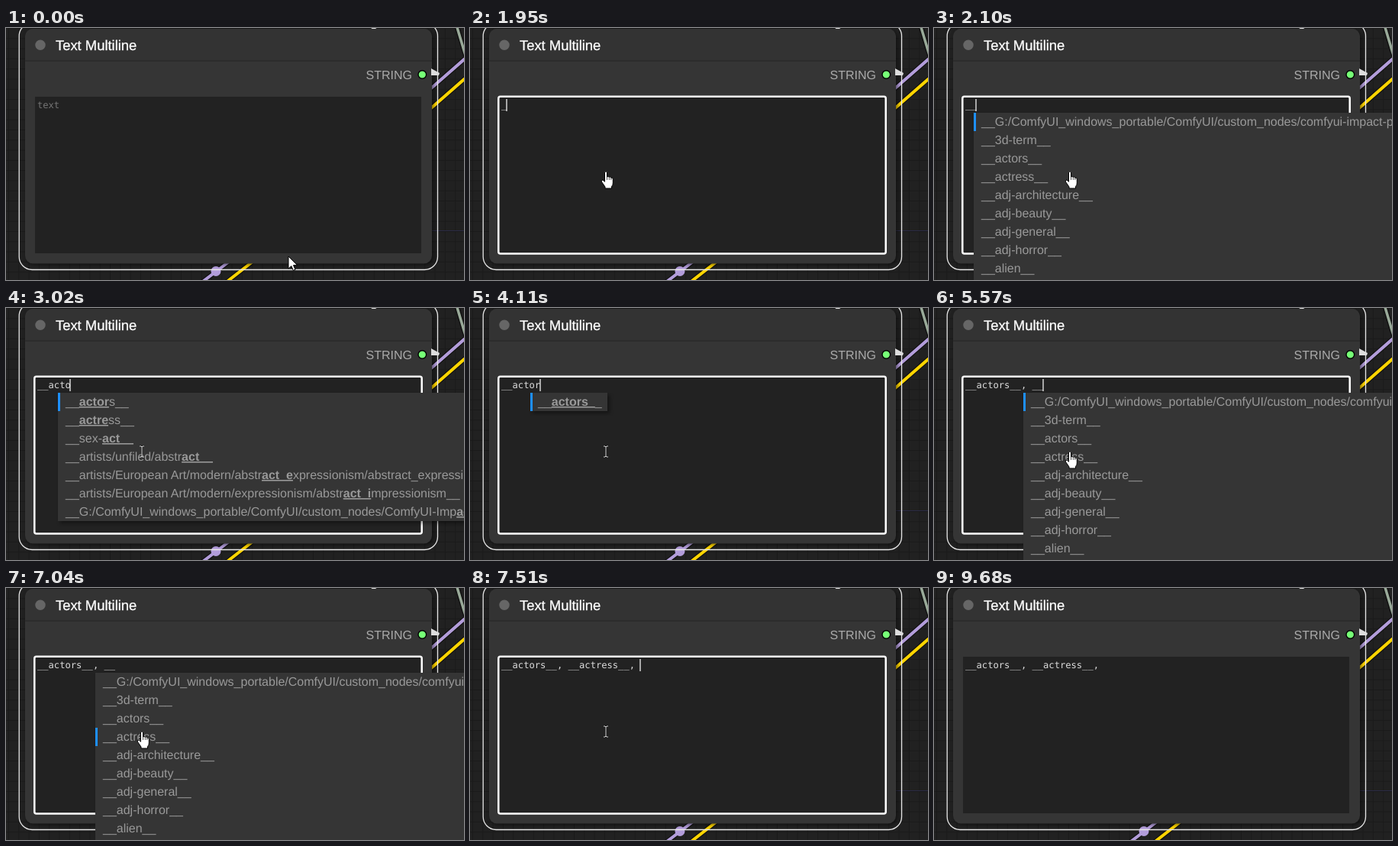
An HTML page for the animation above (9.76 s loop, 600 by 330 pixels).

```html
<!DOCTYPE html>
<html lang="en">
<head>
<meta charset="utf-8">
<title>Text Multiline</title>
<style>
  html, body { margin: 0; width: 100%; height: 100%; overflow: hidden; background: #1f1f1f; }
  svg { display: block; width: 600px; height: 330px; }
  text { white-space: pre; text-rendering: geometricPrecision; }
  .ui { font-family: "Liberation Sans", Arial, sans-serif; font-size: 16px; fill: #999; }
  .mono { font-family: "DejaVu Sans Mono", monospace; font-size: 12.12px; }
  .hit { font-weight: bold; text-decoration: underline; }
</style>
</head>
<body>
<svg viewBox="0 0 600 330" xmlns="http://www.w3.org/2000/svg">
  <defs>
    <pattern id="grid" width="13.3" height="13.3" patternUnits="userSpaceOnUse" x="3" y="0">
      <rect width="13.3" height="13.3" fill="#212121"/>
      <path d="M0 .5H13.3M.5 0V13.3" stroke="#1a1a1a"/>
    </pattern>
    <filter id="soft" x="-10%" y="-10%" width="120%" height="120%"><feGaussianBlur stdDeviation="2.5"/></filter>
  </defs>

  <rect width="600" height="330" fill="url(#grid)"/>
  <path d="M558 265.5H600" stroke="#2b2b45"/>
  <g fill="none">
    <g stroke="#111" stroke-width="6.5">
      <path d="M590 -4L602 36M250 338L300 300M282 338L332 299M550 85L606 36M550 111L606 62"/>
    </g>
    <path d="M590 -4L602 36" stroke="#99aa99" stroke-width="3.5"/>
    <path d="M250 338L300 300M550 85L606 36" stroke="#b39ddb" stroke-width="4"/>
    <path d="M282 338L332 299M550 111L606 62" stroke="#ffd500" stroke-width="4"/>
    <path d="M476 -3L486 3" stroke="#fff" stroke-width="3"/>
  </g>
  <circle cx="275" cy="318.5" r="6.5" fill="#b39ddb"/>

  <rect x="27" y="3" width="533" height="307" rx="10" fill="#000" opacity=".5" filter="url(#soft)"/>
  <rect x="17.2" y="-6.5" width="548.3" height="323" rx="17" fill="none" stroke="#e8e8e8" stroke-width="1.3"/>
  <rect x="25" y="1" width="533" height="307.5" rx="10.5" fill="#353535"/>
  <path d="M25 43V11.500a10.500 10.500 0 0 1 10.500-10.500H547.500a10.500 10.500 0 0 1 10.500 10.500V43Z" fill="#333"/>
  <path d="M25 43H558" stroke="#2a2a2a" stroke-width="1.3"/>
  <path d="M557 53L568 59L567 62L557 62Z" fill="#ddd"/>
  <circle cx="45" cy="22.300" r="6.700" fill="#666"/>
  <text class="ui" x="65" y="28.500" style="font-size:18.400px;fill:#fff;stroke:#fff;stroke-width:.3px">Text Multiline</text>
  <text class="ui" x="532" y="67" text-anchor="end" style="fill:#aaa">STRING</text>
  <circle cx="545.300" cy="61" r="5.300" fill="#7f7" stroke="#000" stroke-width="1.400"/>

  <rect x="38" y="90" width="506" height="205" fill="#222"/>
  <rect id="ring" x="37.300" y="89.800" width="507.400" height="205.700" rx="2.500" fill="none" stroke="#fff" stroke-width="2.500"/>
  <text id="typed" class="mono" x="41" y="105"></text>
  <rect id="caret" y="93" width="1.200" height="16" fill="#fff"/>
  <g id="popup"></g>

  <g id="arrow">
    <path d="M0 0V16.200L3.800 12.700L6.400 18.500L9 17.300L6.500 11.700H11.600Z" fill="#fff" stroke="#000" stroke-linejoin="round"/>
  </g>
  <g id="beam" fill="none">
    <path d="M-3 -7H-1L0 -6L1 -7H3M0 -6V6M-3 7H-1L0 6L1 7H3" stroke="#000" stroke-width="2.400" opacity=".45"/>
    <path d="M-3 -7H-1L0 -6L1 -7H3M0 -6V6M-3 7H-1L0 6L1 7H3" stroke="#ddd"/>
  </g>
  <g id="hand">
    <path d="M-1.500 1Q0 -1.500 1.500 1V7Q3 5.700 4.300 7.300Q5.700 6.400 6.800 8Q9.300 7.600 9.300 10V15Q9.300 18 7.500 19.500V22H-1V20L-5.500 13.500Q-6.500 11 -4 11L-1.500 13.300Z"
      fill="#fff" stroke="#000" stroke-linejoin="round"/>
    <path d="M1.500 7V11M4.300 7.500V11M6.800 8V11" stroke="#000" stroke-width=".7"/>
  </g>
</svg>
<script>
const LOOP = 9760, ADVANCE = 7.3, ROW = 24;
const $ = id => document.getElementById(id);
const ROOT = "__G:/ComfyUI_windows_portable/ComfyUI/custom_nodes/";
const ALL = [ROOT + "comfyui-impact-pack/wildcards__", "__3d-term__", "__actors__", "__actress__",
  "__adj-architecture__", "__adj-beauty__", "__adj-general__", "__adj-horror__", "__alien__", "__animals__"];
const ACT = ["__actors__", "__actress__", "__sex-act__", "__artists/unfiled/abstract__",
  "__artists/European Art/modern/abstract_expressionism/abstract_expressionism__",
  "__artists/European Art/modern/expressionism/abstract_impressionism__",
  ROOT + "ComfyUI-Impact-Pack/wildcards__"];

const FIRST = "__actors__, ", FULL = FIRST + "__actress__, ";
// Each track lists [start time, value].
const TEXT = [[0, ""], [1720, "_"], [2100, "__"], [2410, "__a"], [2640, "__ac"], [2870, "__act"],
  [3020, "__acto"], [3100, "__actor"], [4340, FIRST], [5260, FIRST + "_"], [5490, FIRST + "__"], [7420, FULL]];
const CARET = [[0, 0], [460, 1], [940, 0], [1410, 1], [3560, 0], [4110, 1], [4880, 0], [5260, 1],
  [6030, 0], [6500, 1], [7040, 0], [7420, 1], [7970, 0], [8520, 1], [8980, 0], [9530, 1], [9680, 0]];
// Popup value: prefix the list was opened for, or an empty string.
const POPUP = [[0, ""], [2020, "_"], [2100, "__"], [2490, "__a"], [2640, "__ac"], [2870, "__act"],
  [3100, "__actor"], [4420, ""], [5420, FIRST + "_"], [5570, FIRST + "__"], [7510, ""]];
const PICK = [[0, 0], [6340, 1], [6580, 2], [6890, 3], [7510, 0]];
const HAND = [[0, 0], [1950, 1], [3100, 0], [5340, 1], [7510, 0]];
const HOVER_BEAM = [[0, 0], [2490, 1], [3100, 0]];

const at = (track, t) => track.reduce((v, [start, next]) => t >= start ? next : v, track[0][1]);
const step = (t, from, to, count) =>
  t < from ? 0 : Math.min(1, (Math.floor((t - from) / (to - from) * (count - 1) + 1e-6) + 1) / count);
const show = (node, on) => node.setAttribute("visibility", on ? "visible" : "hidden");

function pointer(t) {
  if (t < 8520) {
    const k = step(t, 70, 540, 7), e = 1 - (1 - k) ** 2;
    return [370 - 192 * e, 299 - 111 * e];
  }
  const k = step(t, 8520, 9220, 8), u = 1 - k;
  const curve = (a, b, c, d) => u ** 3 * a + 3 * u * u * k * b + 3 * u * k * k * c + k ** 3 * d;
  return [curve(178, 95, 230, 450), curve(188, 210, 285, 345)];
}

function markup(item, word) {
  const term = word.replace(/^_+/, "");
  const i = term ? item.indexOf(term) : -1;
  if (i < 0) return item;
  const end = i + word.length;
  return `${item.slice(0, i)}<tspan class="hit">${item.slice(i, end)}</tspan>${item.slice(end)}`;
}

let popupKey = null;
function drawPopup(prefix, pick) {
  const key = prefix + "|" + pick;
  if (key === popupKey) return;
  popupKey = key;
  if (!prefix) { $("popup").innerHTML = ""; return; }
  const word = prefix.split(", ").pop();
  const items = word === "__actor" ? ["__actors__"]
    : word.startsWith("__ac") ? ACT
    : word === "__a" ? ALL.slice(2) : ALL;
  const x = Math.round(41 + 5.43 * prefix.length), y = 111;
  const w = items.length === 1 ? 101 : 700, h = ROW * items.length;
  $("popup").innerHTML =
    `<rect x="${x + 3}" y="${y + 3}" width="${w}" height="${h}" fill="#000" opacity=".4" filter="url(#soft)"/>` +
    `<rect x="${x}" y="${y}" width="${w}" height="${h}" fill="#353535"/>` +
    `<rect x="${x}" y="${y + ROW * pick}" width="3" height="${ROW}" fill="#1e90ff"/>` +
    items.map((item, i) =>
      `<text class="ui" x="${x + 10}" y="${y + 17 + ROW * i}">${markup(item, word)}</text>`).join("");
}

function draw(t) {
  const text = at(TEXT, t);
  $("typed").textContent = text || "text";
  $("typed").setAttribute("fill", text ? "#ddd" : "#757575");
  show($("ring"), t >= 460 && t < 9680);
  show($("caret"), at(CARET, t));
  $("caret").setAttribute("x", Math.round(40.5 + ADVANCE * text.length) - 0.6);
  drawPopup(at(POPUP, t), at(PICK, t));

  const [x, y] = pointer(t);
  const inside = y < 295 && x > 38 && x < 544;
  const kind = !inside ? "arrow" : at(HAND, t) && !at(HOVER_BEAM, t) ? "hand" : "beam";
  for (const id of ["arrow", "beam", "hand"]) {
    show($(id), id === kind);
    $(id).setAttribute("transform", `translate(${x.toFixed(1)} ${y.toFixed(1)})`);
  }
}

const begin = performance.now();
function tick() {
  draw((performance.now() - begin) % LOOP);
  requestAnimationFrame(tick);
}
draw(0);
requestAnimationFrame(tick);
</script>
</body>
</html>
```
